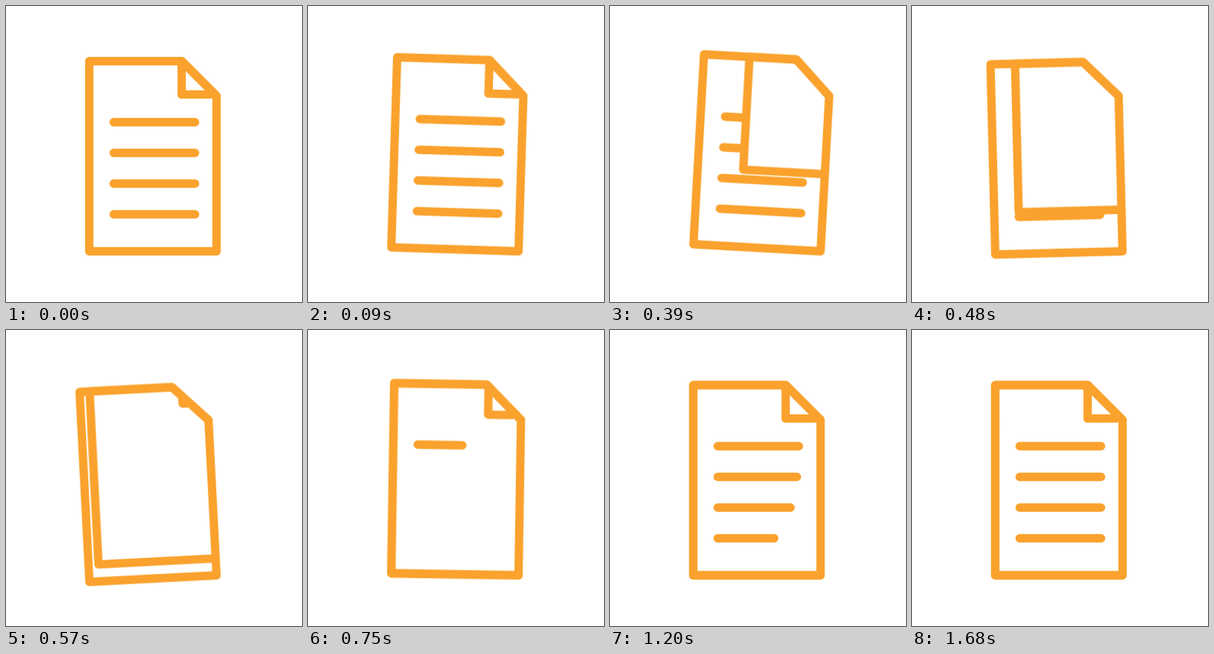
These frames come from a looping animation (400 by 400 pixels, 2.4 s). An HTML page without scripts:

```html
<!DOCTYPE html>
<html lang="en">
<head>
<meta charset="utf-8">
<title>Page turn</title>
<style>
  html, body { margin: 0; width: 100%; height: 100%; overflow: hidden; background: #fff; }
  svg { display: block; width: 100vw; height: 100vh; }

  .sheet {
    fill: none; stroke: #faa22d; stroke-width: 11.3;
    stroke-linecap: round; stroke-linejoin: round;
    transform-origin: 284.5px 331.5px;
    animation: sway 2.4s cubic-bezier(.37, 0, .63, 1) infinite;
  }
  @keyframes sway {
    0% { transform: rotate(0deg); }
    11.25% { transform: rotate(7deg); }
    23.125% { transform: rotate(-3deg); }
    35% { transform: rotate(2deg); }
    47.5%, 100% { transform: rotate(0deg); }
  }

  /* the corner is pulled across the page and covers the old lines */
  .peel { fill: #fff; animation: peel 2.4s cubic-bezier(.33, .67, .67, 1) infinite; }
  @keyframes peel {
    0%, 10.375% { d: path("M284.5 121.5 L237.5 74.5 L237.3 74.5 L237.3 119.7 L275.5 119.7"); }
    30.375%, 100% { d: path("M284.5 121.5 L237.5 74.5 L112.5 74.5 L112.5 331.5 L284.5 331.5"); }
  }

  .fold { animation: fold 2.4s cubic-bezier(.33, .67, .67, 1) infinite; }
  @keyframes fold {
    0%, 22.083% { d: path("M254.3 91.3 L254.3 91.3 L254.3 91.3"); }
    37.5%, 100% { d: path("M237.3 74.5 L237.3 119.7 L275.5 119.7"); }
  }

  /* new lines are written one after another */
  .fresh { animation: show 2.4s step-end infinite; }
  @keyframes show {
    0% { opacity: 0; }
    25%, 100% { opacity: 1; }
  }
  .fresh use {
    visibility: hidden; stroke-dasharray: 110 200;
    animation: write 2.4s calc(650ms + var(--i) * 133ms) infinite;
  }
  @keyframes write {
    0% { visibility: visible; stroke-dashoffset: 110; animation-timing-function: cubic-bezier(.165, .84, .44, 1); }
    25.625%, 75% { visibility: visible; stroke-dashoffset: 0; }
    75.01%, 100% { visibility: hidden; stroke-dashoffset: 0; }
  }
</style>
</head>
<body>
<svg viewBox="0 0 400 400">
  <defs>
    <path id="line" d="M145.5 157 H255.5"/>
  </defs>
  <g class="sheet">
    <use href="#line"/>
    <use href="#line" y="41.5"/>
    <use href="#line" y="83"/>
    <use href="#line" y="124.5"/>
    <path class="peel" d="M284.5 121.5 L237.5 74.5 L237.3 74.5 L237.3 119.7 L275.5 119.7"/>
    <path d="M112.5 74.5 H237.5 L284.5 121.5 V331.5 H112.5 Z"/>
    <path class="fold" d="M254.3 91.3 L254.3 91.3 L254.3 91.3"/>
    <g class="fresh">
      <use href="#line" style="--i:0"/>
      <use href="#line" y="41.5" style="--i:1"/>
      <use href="#line" y="83" style="--i:2"/>
      <use href="#line" y="124.5" style="--i:3"/>
    </g>
  </g>
</svg>
</body>
</html>
```
